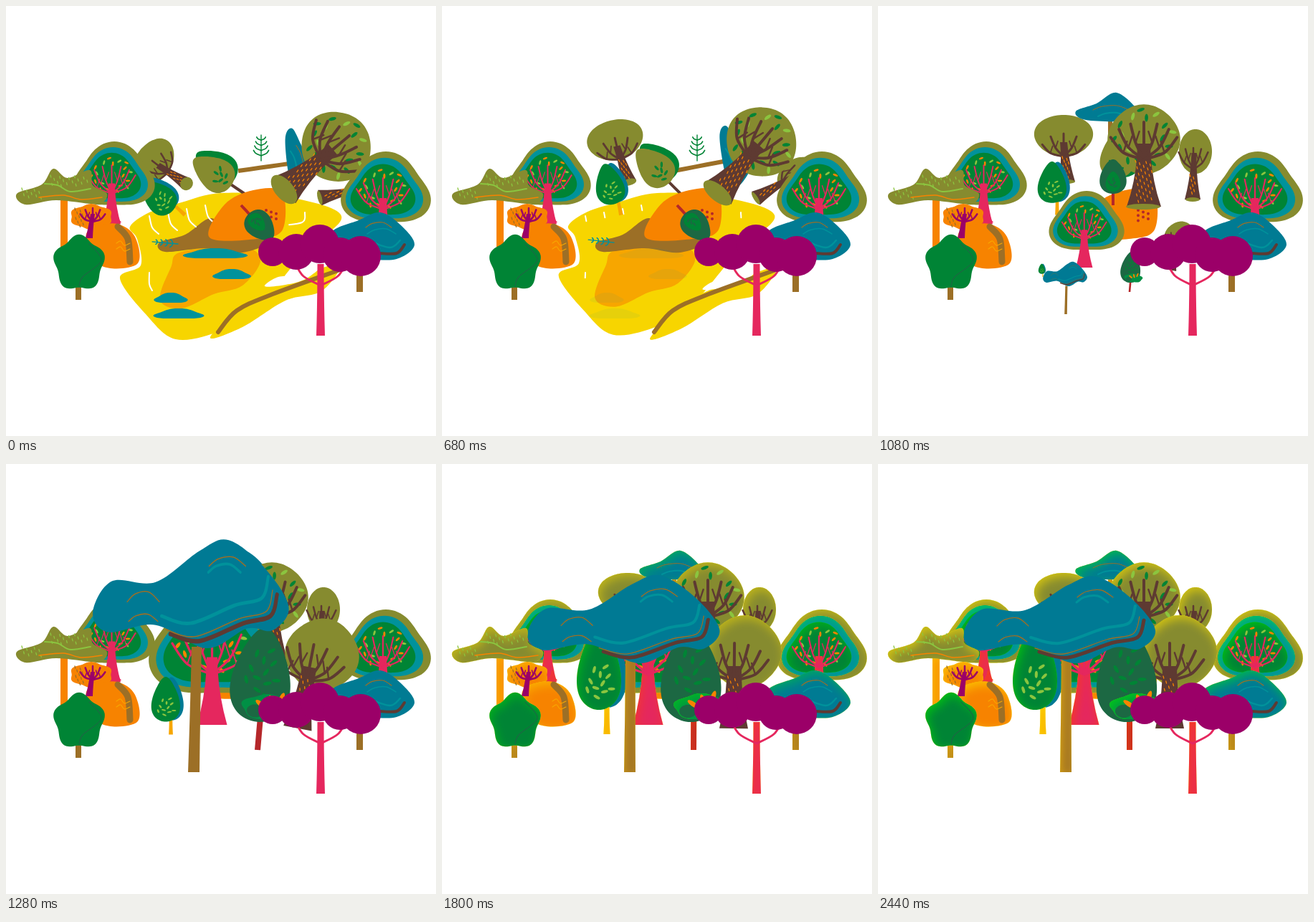
An HTML page with a canvas that plays this animation: 600x600 px, repeating every 3000 ms.

```html
<!DOCTYPE html>
<html lang="en">
<head>
<meta charset="utf-8">
<title>Growing forest</title>
<style>
html, body { margin: 0; width: 100%; height: 100%; overflow: hidden; background: #fff; }
canvas { display: block; width: 600px; height: 600px; }
</style>
</head>
<body>
<canvas id="stage" width="600" height="600"></canvas>
<script>
const ctx = document.getElementById('stage').getContext('2d');
const OLIVE = '#868b2f', GREEN = '#008435', TEAL = '#00929b', BLUE = '#007a94', LAGOON = '#007b93',
  PLUM = '#9b0068', PINK = '#e5275e', ORANGE = '#f78300', YELLOW = '#f7d500', AMBER = '#f7a600',
  EARTH = '#9c6f26', BARK = '#5e3a32', PINE = '#1c6843', RED = '#b5272a', LIME = '#8bc53f';
const UNLIT = [BLUE, PLUM, BARK, PINE];
let light = 0;

const ease = (t, a, b) => {
  const x = Math.min(1, Math.max(0, (t - a) / (b - a)));
  return x * x * (3 - 2 * x);
};

// Smooth curve through a few key points
function outline(points, closed) {
  const v = typeof points === 'string' ? points.split(' ').map(Number) : points;
  const p = new Path2D(), n = v.length / 2;
  const at = i => {
    i = closed ? (i + n) % n : Math.min(n - 1, Math.max(0, i));
    return [v[2 * i], v[2 * i + 1]];
  };
  p.moveTo(...at(0));
  for (let i = 0; i < (closed ? n : n - 1); i++) {
    const [a, b, c, d] = [i - 1, i, i + 1, i + 2].map(at);
    p.bezierCurveTo(b[0] + (c[0] - a[0]) / 6, b[1] + (c[1] - a[1]) / 6,
      c[0] - (d[0] - b[0]) / 6, c[1] - (d[1] - b[1]) / 6, ...c);
  }
  if (closed) p.closePath();
  return p;
}

function fillLit(color, path) {
  ctx.fillStyle = color;
  ctx.fill(path);
  if (!light || UNLIT.includes(color)) return;
  // Sunlight along the upper left inner edge
  const outside = new Path2D();
  outside.rect(-1500, -1500, 4000, 4000);
  outside.addPath(path);
  ctx.save();
  ctx.clip(path);
  ctx.globalCompositeOperation = 'overlay';
  ctx.shadowColor = `rgba(255,225,0,${.62 * light})`;
  ctx.shadowBlur = 14;
  ctx.shadowOffsetX = 3;
  ctx.shadowOffsetY = 5;
  ctx.fillStyle = '#fe0';
  ctx.fill(outside, 'evenodd');
  ctx.restore();
}

const shape = (color, points) => fillLit(color, outline(points, true));

// Ellipse with optional lobes; a positive neck narrows the top into a pear
function blob(color, x, y, rx, ry, { lobes = 0, amp = 0, neck = 0 } = {}) {
  const v = [];
  for (let i = 0; i < 48; i++) {
    const a = i / 24 * Math.PI, r = 1 + amp * Math.cos(lobes * a);
    v.push(x + rx * r * Math.sin(a) * (1 - neck * Math.cos(a)), y - ry * r * Math.cos(a));
  }
  shape(color, v);
}

// Trunk from half width w at the top, flaring to foot
function trunk(color, x, top, bottom, w, foot = w, lean = 0) {
  const p = new Path2D();
  for (let i = 0; i < 12; i++) {
    const k = (i < 6 ? i : 11 - i) / 5, half = w + (foot - w) * k * k;
    p.lineTo(x + lean * k + (i < 6 ? -half : half), top + (bottom - top) * k);
  }
  p.closePath();
  fillLit(color, p);
}

function line(color, width, points) {
  ctx.strokeStyle = color;
  ctx.lineWidth = width;
  ctx.lineCap = 'round';
  ctx.stroke(outline(points, false));
}

const arch = (color, width, x, y, rx, ry) => line(color, width, [x - rx, y, x - rx / 2, y - ry * .8, x + rx / 3, y - ry, x + rx, y]);

function oval(color, x, y, rx, ry, angle = 0) {
  ctx.fillStyle = color;
  ctx.beginPath();
  ctx.ellipse(x, y, rx, ry, angle, 0, 7);
  ctx.fill();
}

// Leaves spread over an elliptical ring; hole is its inner share
function leaves(colors, x, y, rx, ry, count, size, hole = 0) {
  for (let i = 0; i < count; i++) {
    const a = i * 2.4, r = hole + (1 - hole) * Math.sqrt((i + .5) / count);
    oval(colors[i % colors.length], x + rx * r * Math.cos(a), y + ry * r * Math.sin(a), size, size * .42, i * 1.3 - 1);
  }
}

// Branches that sweep outwards, then up, each with one twig
function fan(color, x, y, r, count, width, spread = 2.2) {
  for (let i = 0; i < count; i++) {
    const a = (i / (count - 1) - .5) * spread, s = Math.sin(a), c = Math.cos(a);
    const mx = x + r * .62 * s, my = y - r * (.1 + .4 * c * c);
    line(color, width, [x, y, mx, my, x + r * s, y - r * (.25 + .75 * c)]);
    line(color, width * .6, [mx, my, mx - r * .1 * Math.sign(s), my - r * .3]);
  }
}

function specks(color, x, y, w, h, count) {
  for (let i = 0; i < count; i++) {
    const px = x + w * (i * .618 % 1), py = y + h * i / count;
    line(color, 1.3, [px, py, px + .8, py + 3]);
  }
}

function sprig(color, x, y, h, w) {
  line(color, 1.4, [x, y, x, y - h]);
  for (let i = 1; i < 5; i++) {
    const v = y - h * i / 5, r = w * (1 - i * .12);
    for (const side of [-r, r]) line(color, 1.6, [x, v, x + side * .7, v - r * .3, x + side, v - r * .7]);
  }
}

// Draw around a pivot: shift, turn in degrees, scale
function pose(x, y, { dx = 0, dy = 0, turn = 0, sx = 1, sy = sx }, draw) {
  if (sx < .001) return;
  ctx.save();
  ctx.translate(x + dx, y + dy);
  ctx.rotate(turn * Math.PI / 180);
  ctx.scale(sx, sy);
  ctx.translate(-x, -y);
  draw();
  ctx.restore();
}

function ground(t) {
  const early = ease(t, 40, 640), late = ease(t, 620, 880), gone = ease(t, 900, 1110);
  pose(320, 325, { sx: 1 - gone }, () => {
    pose(310, 262, { sx: 1 - .18 * late, sy: 1 - .23 * late }, () =>
      shape(YELLOW, '300 261 390 266 468 293 415 345 350 422 300 453 237 465 195 430 159 380 188 362 183 325 173 308 200 288 245 274'));
    pose(440, 372, { dy: 6 * early * (1 - late), sx: 1 - .25 * late, sy: 1 - .28 * late }, () => {
      shape(YELLOW, '285 462 345 405 440 366 468 361 440 398 390 411 330 448');
      if (late < .5) shape('#fff', '361 391 380 378 410 376 440 363 418 381 390 389');
    });
    line(EARTH, 6, '296 455 322 425 372 402 466 368');
    pose(0, 0, { dx: 14 * late - 4 * early * (1 - late), dy: -18 * late }, () =>
      shape(AMBER, '230 365 245 343 330 336 355 355 330 390 290 402 245 422 215 410'));
    pose(0, 0, { dx: 17 * late }, () =>
      shape(EARTH, '214 330 250 319 286 296 310 318 372 326 330 344 280 338 222 343'));
    ctx.globalAlpha = 1 - .92 * ease(t, 40, 640) - .08 * late;
    for (const [x, y, r] of [[292, 346, 42], [315, 375, 25], [230, 408, 22], [241, 430, 33]])
      blob(TEAL, x, y, r, 7, { lobes: 3, amp: .16 });
    ctx.globalAlpha = 1;
    const left = 1 - .75 * early - .25 * late;
    if (left < .02) return;
    ctx.setLineDash([34 * left, 500]);
    for (let i = 0; i < 4; i++) {
      const x = 278 - 26 * i, y = 278 + 5 * i;
      line('#fff', 2, [x, y, x + 4, y + 16, x + 13, y + 25]);
    }
    line('#fff', 2, '200 372 200 388 204 397');
    line('#fff', 2, '417 288 413 302 375 307');
    ctx.setLineDash([]);
  });
  pose(240, 332, { turn: -85 + 60 * ease(t, 660, 880), dy: -14 * late, sx: 1 - gone }, () => sprig(TEAL, 240, 332, 36, 6));
}

function mound() {
  shape(ORANGE, '284 323 305 277 345 257 385 260 386 312 350 325');
  for (let i = 0; i < 7; i++) oval(RED, 363 + i % 3 * 7, 285 + i * 2.4, 2, 2);
}

function nestedTree() {
  [OLIVE, TEAL, GREEN].forEach((color, i) => {
    const k = 1 - .14 * i;
    blob(color, 530 - 2 * i, 258 + i, 60 * k, 49 * k, { lobes: 3, amp: .12 });
  });
  leaves([ORANGE, LIME, ORANGE], 526, 256, 33, 29, 20, 3.6, .45);
  trunk(PINK, 526, 268, 331, 5, 14);
  fan(PINK, 526, 284, 44, 7, 2.2, 2);
}

// Pear-shaped tree standing on the origin
function pearTree() {
  blob(BLUE, 1, -95, 25, 57, { neck: .35 });
  trunk(AMBER, 0, -40, -1, 3.5, 4.5);
  blob(GREEN, -11, -94, 29, 59, { neck: .4 });
  leaves([LIME], -10, -72, 20, 26, 11, 5);
}

function pinePear() {
  trunk(RED, 328, 255, 278, 2);
  blob(PINE, 328, 238, 18, 24, { neck: .3 });
  blob(GREEN, 328, 245, 10, 14, { neck: .3 });
  leaves([PINE], 328, 247, 6, 7, 5, 3);
}

function olivePear() {
  line(BARK, 4, '333 262 333 236');
  blob(GREEN, 342, 207, 22, 32, { neck: .4 });
  blob(OLIVE, 333, 208, 22, 32, { neck: .4 });
  leaves([GREEN], 334, 220, 12, 12, 7, 4);
}

function roundTree(cap) {
  blob(OLIVE, 259, 181, 41, 29, { neck: -.08 });
  trunk(BARK, 259, 190, 245, 5, 11, 5);
  fan(BARK, 259, 210, 32, 5, 3, 2.4);
  specks(ORANGE, 257, 210, 10, 30, 12);
  oval(OLIVE, 264, 245, 11, cap);
}

function sideTree() {
  blob(OLIVE, 443, 203, 23, 31);
  trunk(BARK, 441, 205, 270, 3.5, 11, -2);
  fan(BARK, 440, 228, 30, 5, 2.5, 1.5);
  specks(ORANGE, 435, 235, 8, 28, 8);
  oval(OLIVE, 439, 270, 10, 3);
}

function backBlueTree() {
  trunk(EARTH, 324, 155, 230, 3);
  shape(LAGOON, '276 147 305 136 333 121 362 146 350 160 290 159');
  arch(EARTH, 1, 325, 145, 25, 6);
  arch(TEAL, 2, 327, 154, 20, 5);
}

function bigTree(cap) {
  blob(OLIVE, 371, 186, 50, 48, { lobes: 4, amp: .015 });
  leaves([GREEN, LIME, GREEN], 372, 184, 43, 41, 18, 5.5, .5);
  trunk(BARK, 371, 192, 280, 9, 24);
  fan(BARK, 371, 214, 52, 7, 4, 2.2);
  specks(ORANGE, 359, 215, 24, 58, 32);
  oval(OLIVE, 370, 280, 24, cap);
}

function grandOlive() {
  blob(OLIVE, 421, 262, 51, 50, { lobes: 4, amp: .02 });
  trunk(BARK, 407, 282, 369, 10, 20);
  fan(BARK, 407, 302, 52, 7, 4, 2.3);
  specks(ORANGE, 398, 296, 16, 56, 16);
}

function pineTree() {
  trunk(RED, 351, 355, 399, 4);
  blob(PINE, 347, 294, 40, 66, { neck: .35 });
  leaves([GREEN], 348, 290, 26, 36, 12, 6);
  blob('#009045', 362, 339, 38, 18, { lobes: 5, amp: .06 });
  blob(PINE, 343, 345, 12, 9);
  for (let i = 0; i < 3; i++) oval(ORANGE, 350 + 14 * i, 335 - 5 * i, 9, 3.3, .6 + .65 * i);
}

function blueTree(settle) {
  trunk(EARTH, 263 + 3 * settle, 255, 430, 7, 8, -1 - 3 * settle);
  pose(262, 278, { dx: 5 * settle, dy: -21 * settle * settle, sx: 1 + .02 * settle, sy: 1 + .245 * settle }, () => {
    shape(BLUE, '119 238 145 203 205 204 265 169 305 157 355 189 387 232 365 258 330 256 275 278 205 252 140 260');
    const fold = (color, width, dx, dy) => pose(300, 250, { dx, dy }, () =>
      line(color, width, '225 262 265 270 325 250 362 242 371 218'));
    fold(BARK, 5, 0, 0);
    fold(EARTH, 1.3, -6, -5);
    fold(TEAL, 4, -12, -20);
    arch(EARTH, 1.3, 188, 226, 22, 11);
    arch(EARTH, 1.3, 188, 248, 20, 8);
    arch(EARTH, 1.3, 303, 186, 25, 10);
    arch(TEAL, 3, 299, 193, 22, 9);
  });
}

function cloudTree() {
  trunk(ORANGE, 81, 265, 342, 5);
  shape(OLIVE, '15 262 50 249 66 227 86 240 117 229 121 250 141 262 128 276 70 271 27 277');
  specks(LIME, 22, 254, 28, 14, 9);
  specks(LIME, 62, 236, 54, 14, 16);
  line(LIME, 2, '54 248 72 250 90 259 118 255');
  line(ORANGE, 1.5, '46 267 80 264 105 270 134 267');
}

function orangeBush() {
  trunk(PINK, 154, 288, 302, 1, 7);
  blob(ORANGE, 119, 294, 29, 17, { lobes: 6, amp: .06 });
  specks(EARTH, 96, 282, 12, 26, 10);
  shape(ORANGE, '112 325 122 309 155 304 180 322 183 360 134 363');
  line(EARTH, 9, '156 308 170 325 173 357');
  for (const y of [331, 339]) line(AMBER, 1.2, [154, y, 160, y - 3, 165, y + 3, 173, y]);
  trunk(PLUM, 121, 290, 324, 3, 5, -5);
  fan(PLUM, 121, 301, 19, 5, 2.5, 2.3);
}

function greenBush() {
  trunk(EARTH, 101, 392, 410, 4);
  blob(GREEN, 102, 359, 34, 37, { lobes: 5, amp: .09 });
  line(PINE, 1.2, '116 332 133 355 107 378 102 391');
}

function rightBlueTree() {
  trunk(EARTH, 493.5, 345, 399, 4.5);
  shape(LAGOON, '453 318 492 299 522 288 550 305 570 333 545 353 500 354 465 362');
  line(BARK, 4, '520 345 545 345 556 333');
  line(TEAL, 2.5, '500 325 535 337 550 327');
  arch(EARTH, 1.2, 520, 309, 18, 7);
  arch(TEAL, 1.5, 524, 318, 20, 7);
}

function plumTree() {
  trunk(PINK, 439, 360, 460, 4.5, 6);
  for (const side of [-1, 1]) line(PINK, 3, [439 + 36 * side, 358, 439 + 24 * side, 377, 439, 390]);
  for (const [x, y, r] of [[372, 343, 20], [405, 343, 25], [438, 332, 27], [466, 347, 24], [495, 349, 28]])
    oval(PLUM, x, y, r, r);
}

function draw(t) {
  light = ease(t, 1280, 2060);
  ctx.clearRect(0, 0, 600, 600);
  const rise = 1 - ease(t, 560, 980), first = 1 - ease(t, 200, 920);
  const grow = a => ease(t, a, a + 260), settle = 1 - ease(t, 1280, 1880);

  ground(t);
  pose(264, 245, { dx: -12 * first, dy: 3 * first, turn: -52 * first, sx: 1 - .14 * first }, () => roundTree(3 + 7 * first));
  pose(250, 292, { turn: -47 * first }, () => pose(0, 0, { dx: 250, dy: 292, sx: .65, sy: .49 }, pearTree));
  if (t < 1000) sprig(GREEN, 356, 216, 36, 12);
  pose(324, 230, { turn: 82 * (1 - ease(t, 640, 1000)) }, backBlueTree);
  pose(333, 262, { turn: -56 * rise }, olivePear);
  mound();
  pose(328, 278, { turn: 137 * (1 - ease(t, 680, 960)) }, pinePear);
  pose(440, 268, { turn: 76 * (1 - ease(t, 560, 940)) }, sideTree);
  pose(370, 280, { dx: 18 * rise, dy: -24 * rise, turn: 50 * rise }, () => bigTree(4 + 9 * rise));

  pose(471, 203, { dx: -373, dy: -14, sx: .9 }, nestedTree);
  nestedTree();
  pose(288, 366, { sx: grow(940) }, () => pose(471, 203, { dx: -266, dy: -31, sx: 1.5 }, nestedTree));
  pose(408, 368, { turn: 11 * settle, sx: grow(960) }, grandOlive);
  pose(351, 399, { turn: 5 * settle, sx: grow(980) }, pineTree);
  const ripe = ease(t, 1290, 1540), sprout = grow(1000);
  pose(0, 0, { dx: 230, dy: 378, sx: sprout * (.65 + .35 * ripe), sy: sprout * (.53 + .47 * ripe) }, pearTree);
  pose(262, 430, { sx: grow(1000) }, () => blueTree(settle));

  cloudTree();
  orangeBush();
  greenBush();
  rightBlueTree();
  plumTree();
}

let shown = -1;
function tick() {
  const t = Math.floor(performance.now() % 3000 / 40) * 40;
  if (t !== shown) draw(shown = t);
  requestAnimationFrame(tick);
}
tick();
</script>
</body>
</html>
```
